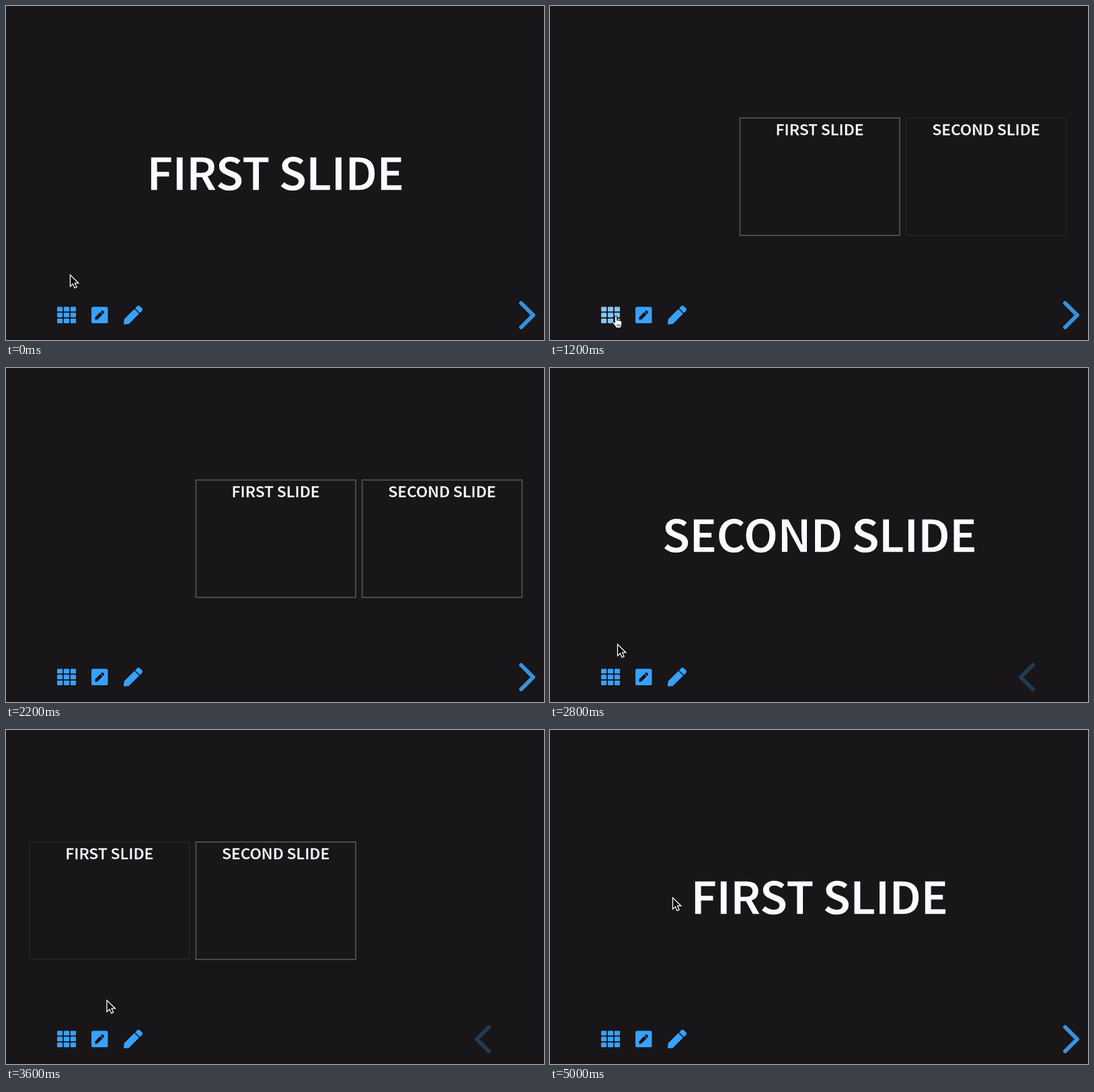
An HTML page for the animation above (5100 ms loop, 800x498 px).

```html
<!DOCTYPE html>
<html lang="en">
<head>
<meta charset="utf-8">
<title>Slide overview</title>
<style>
  html, body { margin: 0; width: 100%; height: 100%; overflow: hidden; background: #181619; }
  svg { display: block; width: 800px; height: 498px; }
  /* the background-coloured stroke trims bold to semibold */
  text { font: 600 68px "Noto Sans CJK SC", "Noto Sans CJK JP", sans-serif; letter-spacing: -.025em; text-anchor: middle; fill: #fdfbff; stroke: #181619; stroke-width: .019em; }
  .cell text { font-size: 23.3px; }
  .cell rect { fill: none; stroke: rgb(150, 150, 150); stroke-width: 2; }
  .icon { fill: #38a1fd; }
  .chevron { fill: none; stroke: #3ba0f4; stroke-width: 6; stroke-linecap: round; stroke-linejoin: round; }
</style>
</head>
<body>
<svg viewBox="0 0 800 498">
  <text id="title" x="400" y="274.5"></text>
  <g class="cell"><rect y="167" width="237.6" height="175"/><text y="193">FIRST SLIDE</text></g>
  <g class="cell"><rect y="167" width="237.6" height="175"/><text y="193">SECOND SLIDE</text></g>

  <g id="grid" class="icon" transform="translate(76 446.75) scale(.0547)"></g>
  <g transform="translate(127 446.75) scale(.0547)">
    <rect class="icon" y="32" width="448" height="448" rx="48"/>
    <path fill="#181619" d="M238 178L102 314l-6 57c-1 7 5 14 13 13l57-6L302 242c2-2 2-6 0-8L247 178c-3-2-7-2-9 0zM345 165L315 135c-9-9-25-9-34 0l-23 23c-2 2-2 6 0 8l55 56c3 2 7 2 9 0L345 199c9-9 9-25 0-34z"/>
  </g>
  <path class="icon" transform="translate(175 446.75) scale(.0547)" d="M291 93l128 128-278 278-114 13C11 514-2 501 0 485l13-114zM498 74L438 14c-19-19-49-19-68 0l-57 57 128 128 57-57c19-19 19-49 0-68z"/>

  <path id="left" class="chevron" d="M718 443L700 461L718 479"/>
  <path id="right" class="chevron" d="M766 443L784 461L766 479"/>

  <g id="cursor">
    <path id="arrow" fill="#000" stroke="#fff" stroke-width="1.3" d="M0 0V17L4 13.3L6.6 19.5L9.6 18.2L7 12.2H12.3Z"/>
    <g id="hand" transform="translate(-5.6 0)" stroke="#000">
      <path fill="#fff" d="M4 10.5V2a1.6 1.6 0 0 1 3.2 0v4.8a1.5 1.5 0 0 1 2.6 .3a1.5 1.5 0 0 1 2.4 .6a1.4 1.4 0 0 1 2.2 1.2v3.6c0 2-1.4 3-1.4 5.5H5.8c0-2-3-4.5-4.8-7.3c-.8-1.6 1-2.6 2-1.4z"/>
      <path stroke-width=".8" d="M7.5 12.5v3M9.5 12.5v3M11.4 12.5v3"/>
    </g>
  </g>
</svg>
<script>
const LOOP = 5100, STEP = 100;
const $ = id => document.getElementById(id);
const set = (el, attrs) => { for (const k in attrs) el.setAttribute(k, attrs[k]); };
const show = (el, on) => set(el, { visibility: on ? 'visible' : 'hidden' });
const clamp = p => Math.max(0, Math.min(1, p));
const easeOut = p => 1 - (1 - clamp(p)) ** 2.4;
const smooth = p => p * p * (3 - 2 * p);
const cells = [...document.querySelectorAll('.cell')];

for (let i = 0; i < 9; i++) {
  const r = document.createElementNS('http://www.w3.org/2000/svg', 'rect');
  set(r, { x: i % 3 * 181.33, y: 32 + Math.floor(i / 3) * 160, width: 149.33, height: 128, rx: 24 });
  $('grid').append(r);
}

// time, x, y of the pointer tip
const route = [
  [0, 95.5, 401], [500, 98, 465], [700, 98, 465], [1200, 98, 462], [1700, 590, 262],
  [2400, 590, 262], [2800, 100.5, 412], [3000, 98, 459], [3300, 98, 459],
  [3600, 150, 403], [4000, 181.5, 247], [4300, 181.5, 247], [5000, 182.5, 250]
];

function pointer(t) {
  const i = Math.max(1, route.findIndex(k => k[0] >= t));
  const [t0, x0, y0] = route[i - 1], [t1, x1, y1] = route[i];
  const p = smooth((t - t0) / (t1 - t0));
  return [x0 + (x1 - x0) * p, y0 + (y1 - y0) * p];
}

// rest, out by 10, back to -5, rest
function bounce(t) {
  const stops = [0, 10, -5, 0], s = (t - 440) / 200, i = Math.floor(s);
  if (s < 0 || s >= 3) return 0;
  return stops[i] + (stops[i + 1] - stops[i]) * easeOut(s - i);
}

function draw(t) {
  const away = t >= 2300 && t < 4300, current = away ? 1 : 0;
  const overview = (t >= 900 && t < 2300) || (t >= 3300 && t < 4300);
  const [x, y] = pointer(t);

  $('title').textContent = away ? 'SECOND SLIDE' : 'FIRST SLIDE';
  show($('title'), !overview);

  let overCell = false;
  cells.forEach((cell, i) => {
    const left = 282.4 + 247.3 * (i - current);
    const hover = overview && x > left && x < left + 238 && y > 166 && y < 343;
    overCell ||= hover;
    show(cell, overview);
    set(cell.children[0], { x: left, 'stroke-opacity': hover || i === current ? .4 : .08 });
    set(cell.children[1], { x: left + 118.4 });
  });

  const overIcon = y > 447;
  $('grid').style.fill = overIcon ? '#84c4ff' : '';
  show($('arrow'), !overIcon && !overCell);
  show($('hand'), overIcon || overCell);
  set($('cursor'), { transform: `translate(${x} ${y})`, opacity: t >= 1900 && t < 2300 ? 0 : 1 });

  const first = away ? 1 - easeOut((t - 2205) / 200) : t < 2300 ? 1 : easeOut((t - 4205) / 200);
  const shift = away ? 10 * (1 - first) : bounce(t);
  set($('left'), { opacity: .27 * (1 - first), transform: `translate(${-10 * first} 0)` });
  set($('right'), { opacity: .9 * first, transform: `translate(${shift} 0)` });
}

const start = performance.now();
function tick() {
  const t = (performance.now() - start) % LOOP;
  draw(Math.floor(t / STEP) * STEP);
  requestAnimationFrame(tick);
}
tick();
</script>
</body>
</html>
```
